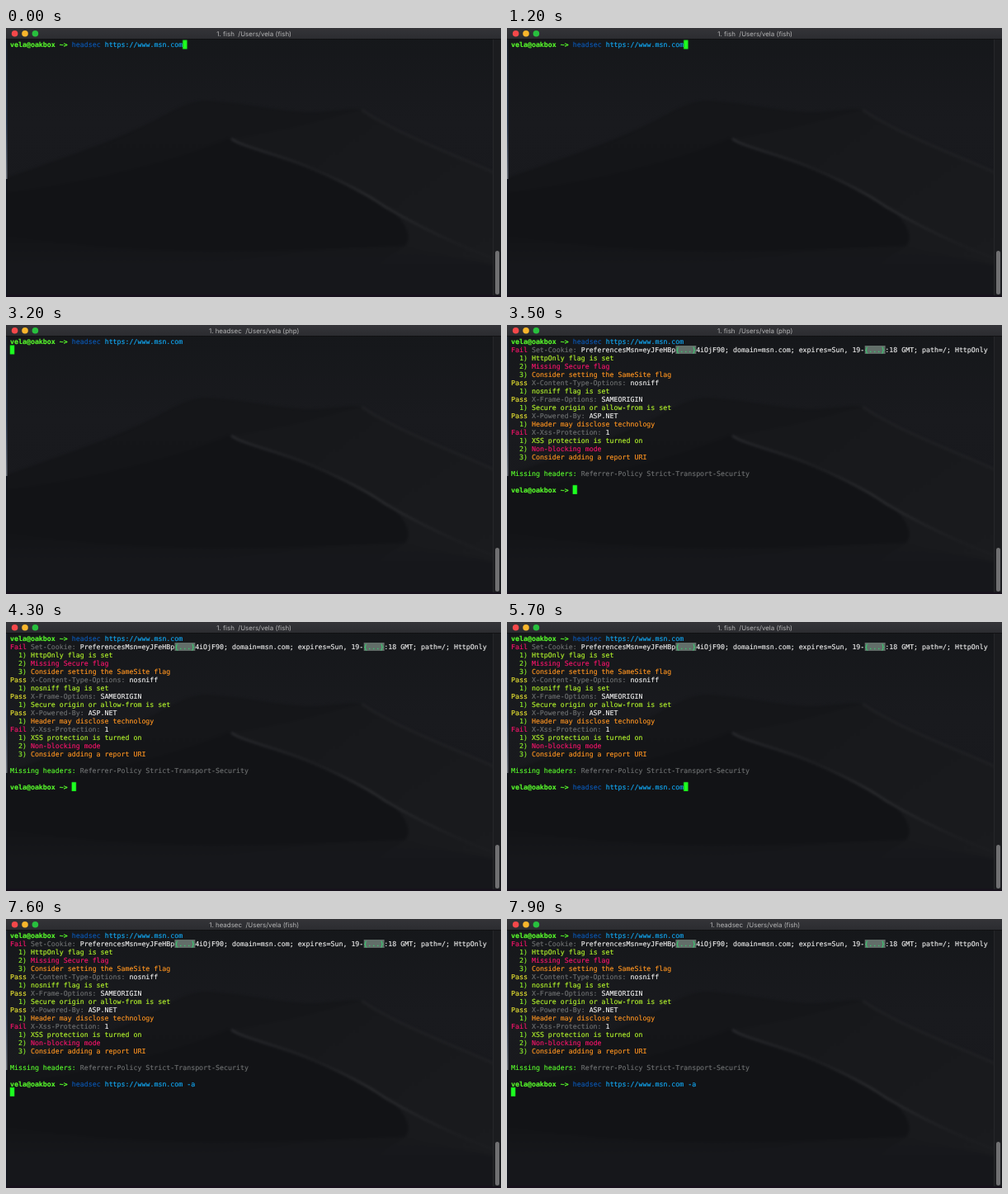
Write an HTML page that moves like this. It is 600 by 326 pixels and loops after 8 s.

```html
<!DOCTYPE html>
<html lang="en">
<head>
<meta charset="utf-8">
<title>Terminal session</title>
<style>
html, body { margin: 0; width: 100%; height: 100%; overflow: hidden; background: #15171a; }
svg { display: block; width: 100vw; height: 100vh; }
text { text-rendering: geometricPrecision; }

.term { font-family: "DejaVu Sans Mono", "Liberation Mono", monospace; font-size: 8.302px; }
.term text { fill: currentColor; stroke: currentColor; stroke-width: .15px; }
.title { font-family: Inter, "Open Sans", sans-serif; font-size: 7.95px; fill: #b4b4b5; text-anchor: middle; }

.ps { color: #58fa2c; font-weight: bold; }
.note { color: #58fa2c; }
.cmd { color: #0b58b4; }
.arg { color: #12a9f5; }
.fail { color: #f5146a; }
.pass { color: #e9e532; }
.ok { color: #b3f52c; }
.warn { color: #ff9420; }
.num { color: #8cf02c; }
.key { color: #6d6f70; }
.val { color: #ececec; }
.gap { color: #35d873; }
.gapBox { fill: #626e69; }

.cursor, .title, .show { animation: 8s step-end infinite; }
.cursor { fill: #1dff20; animation-name: cursor; }
.output { animation-name: output; }
.recall { animation-name: recall; }
.dash { animation-name: dash; }
.all { animation-name: all; }
.idle { animation-name: idle; }
.launch { animation-name: launch; }
.run { animation-name: run; }
.done { animation-name: done; }

/* one text column is 5 units, one line 10 */
@keyframes cursor {
  0% { transform: translate(210px, 0); opacity: 1; }
  8.75% { opacity: 0; }
  15% { opacity: 1; }
  21.25% { opacity: 0; }
  27.5% { opacity: 1; }
  32.5% { transform: translate(0, 10px); }
  43.75% { transform: translate(75px, 180px); }
  60% { transform: translate(210px, 180px); }
  77.5% { transform: translate(215px, 180px); }
  78.75% { transform: translate(220px, 180px); }
  83.75% { transform: translate(225px, 180px); }
  85%, 100% { transform: translate(0, 190px); opacity: 1; }
}
@keyframes output { 0% { opacity: 0; } 43.75%, 100% { opacity: 1; } }
@keyframes recall { 0% { opacity: 0; } 60%, 100% { opacity: 1; } }
@keyframes dash { 0% { opacity: 0; } 78.75%, 100% { opacity: 1; } }
@keyframes all { 0% { opacity: 0; } 83.75%, 100% { opacity: 1; } }

@keyframes idle { 0% { opacity: 1; } 33.75% { opacity: 0; } 53.75% { opacity: 1; } 95%, 100% { opacity: 0; } }
@keyframes launch { 0% { opacity: 0; } 33.75% { opacity: 1; } 36.25% { opacity: 0; } 95%, 100% { opacity: 1; } }
@keyframes run { 0% { opacity: 0; } 36.25% { opacity: 1; } 43.75%, 100% { opacity: 0; } }
@keyframes done { 0% { opacity: 0; } 43.75% { opacity: 1; } 53.75%, 100% { opacity: 0; } }
</style>
</head>
<body>
<svg viewBox="0 0 600 326" preserveAspectRatio="none">
  <defs>
    <linearGradient id="sky" x2="0" y2="1">
      <stop offset="0" stop-color="#15171a"/>
      <stop offset=".35" stop-color="#191a1e"/>
      <stop offset="1" stop-color="#17181c"/>
    </linearGradient>
    <linearGradient id="dune" x2="0" y2="1">
      <stop offset="0" stop-color="#151619"/>
      <stop offset=".6" stop-color="#131417"/>
      <stop offset="1" stop-color="#17181b"/>
    </linearGradient>
    <linearGradient id="slope" x2="1" y2="1">
      <stop offset="0" stop-color="#16171a"/>
      <stop offset="1" stop-color="#1a1b1e"/>
    </linearGradient>
    <linearGradient id="floor" x2="0" y2="1">
      <stop offset="0" stop-color="#17181b" stop-opacity="0"/>
      <stop offset=".5" stop-color="#16171b"/>
      <stop offset="1" stop-color="#16171b"/>
    </linearGradient>
    <linearGradient id="glow" x2="1" y2=".5">
      <stop offset="0" stop-color="#2b2c30"/>
      <stop offset=".35" stop-color="#202124"/>
      <stop offset=".6" stop-color="#303134"/>
      <stop offset="1" stop-color="#1d1e21"/>
    </linearGradient>
    <linearGradient id="edge" x2="0" y2="1">
      <stop offset="0" stop-color="#1a2230"/>
      <stop offset=".6" stop-color="#2b3a52"/>
      <stop offset="1" stop-color="#6d737d"/>
    </linearGradient>
    <linearGradient id="bar" x2="0" y2="1">
      <stop offset="0" stop-color="#343438"/>
      <stop offset="1" stop-color="#2b2c30"/>
    </linearGradient>
    <filter id="soft" color-interpolation-filters="sRGB" x="-10%" y="-10%" width="120%" height="120%"><feGaussianBlur stdDeviation="1.5"/></filter>
  </defs>

  <!-- desert behind the window -->
  <rect width="600" height="326" fill="url(#sky)"/>
  <g filter="url(#soft)">
    <path d="M-5 184C60 160 130 138 180 112C205 98 222 89 240 88C290 90 340 103 372 102C395 101 415 97 433 99C480 132 540 152 605 181V330H-5Z" fill="url(#dune)"/>
    <path d="M272 133C330 128 390 110 433 99C480 132 540 152 605 181V330H380L487 262Z" fill="url(#slope)"/>
    <path d="M272 133C285 144 330 153 370 170C420 190 462 212 478 232C490 248 490 260 482 263C430 268 380 266 330 276L-5 310V200C90 190 210 160 272 133Z" fill="#121316"/>
    <path d="M-5 250C160 280 340 270 480 264L605 290V330H-5Z" fill="url(#floor)"/>
    <path d="M273 134C285 144 330 153 370 170C410 187 440 203 460 217C500 240 550 266 605 284" fill="none" stroke="url(#glow)" stroke-width="2.4"/>
    <path d="M431 99C470 126 525 146 600 179" fill="none" stroke="#202124" stroke-width="3"/>
  </g>
  <rect y="13" width="1.5" height="170" fill="url(#edge)"/>
  <rect y="183" width="1.2" height="143" fill="#101521"/>
  <rect y="323.5" width="600" height="2.5" fill="#17111c"/>

  <!-- window frame -->
  <rect x="590" y="13" width="10" height="311" fill="#1b1c1f"/>
  <rect x="590" y="13" width=".7" height="311" fill="#2c2d30"/>
  <rect x="593" y="270" width="5" height="53" rx="2.5" fill="#707072"/>
  <rect width="600" height="13.5" fill="url(#bar)"/>
  <rect y="13" width="600" height=".7" fill="#0b0b0c"/>
  <circle cx="10.6" cy="6.7" r="3.8" fill="#f5484a"/>
  <circle cx="23" cy="6.7" r="3.8" fill="#f9b62c"/>
  <circle cx="35.4" cy="6.7" r="3.8" fill="#28c03e"/>
  <text class="title idle" x="300.7" y="9.8">1. fish&#160; /Users/vela (fish)</text>
  <text class="title launch" x="300.7" y="9.8">1. headsec&#160; /Users/vela (fish)</text>
  <text class="title run" x="300.7" y="9.8">1. headsec&#160; /Users/vela (php)</text>
  <text class="title done" x="300.7" y="9.8">1. fish&#160; /Users/vela (php)</text>

  <g class="term" transform="translate(5 23.4) scale(.997)">
    <text class="ps">vela@oakbox ~&gt;</text>
    <text x="75" class="cmd">headsec</text>
    <text x="115" class="arg">https://www.msn.com</text>

    <g class="show output">
      <rect class="gapBox" x="200" y="1.6" width="25" height="10"/>
      <rect class="gapBox" x="430" y="1.6" width="25" height="10"/>
      <text y="10"><tspan class="fail">Fail</tspan> <tspan class="key">Set-Cookie:</tspan> <tspan class="val">PreferencesMsn=eyJFeHBp</tspan><tspan class="gap">{...}</tspan><tspan class="val">4iOjF90; domain=msn.com; expires=Sun, 19-</tspan><tspan class="gap">{...}</tspan><tspan class="val">:18 GMT; path=/; HttpOnly</tspan></text>
      <text x="10" y="20"><tspan class="num">1)</tspan> <tspan class="ok">HttpOnly flag is set</tspan></text>
      <text x="10" y="30"><tspan class="num">2)</tspan> <tspan class="fail">Missing Secure flag</tspan></text>
      <text x="10" y="40"><tspan class="num">3)</tspan> <tspan class="warn">Consider setting the SameSite flag</tspan></text>
      <text y="50"><tspan class="pass">Pass</tspan> <tspan class="key">X-Content-Type-Options:</tspan> <tspan class="val">nosniff</tspan></text>
      <text x="10" y="60"><tspan class="num">1)</tspan> <tspan class="ok">nosniff flag is set</tspan></text>
      <text y="70"><tspan class="pass">Pass</tspan> <tspan class="key">X-Frame-Options:</tspan> <tspan class="val">SAMEORIGIN</tspan></text>
      <text x="10" y="80"><tspan class="num">1)</tspan> <tspan class="ok">Secure origin or allow-from is set</tspan></text>
      <text y="90"><tspan class="pass">Pass</tspan> <tspan class="key">X-Powered-By:</tspan> <tspan class="val">ASP.NET</tspan></text>
      <text x="10" y="100"><tspan class="num">1)</tspan> <tspan class="warn">Header may disclose technology</tspan></text>
      <text y="110"><tspan class="fail">Fail</tspan> <tspan class="key">X-Xss-Protection:</tspan> <tspan class="val">1</tspan></text>
      <text x="10" y="120"><tspan class="num">1)</tspan> <tspan class="ok">XSS protection is turned on</tspan></text>
      <text x="10" y="130"><tspan class="num">2)</tspan> <tspan class="fail">Non-blocking mode</tspan></text>
      <text x="10" y="140"><tspan class="num">3)</tspan> <tspan class="warn">Consider adding a report URI</tspan></text>
      <text y="160"><tspan class="note">Missing headers:</tspan> <tspan class="key">Referrer-Policy Strict-Transport-Security</tspan></text>
      <text y="180" class="ps">vela@oakbox ~&gt;</text>
    </g>

    <g class="show recall">
      <text x="75" y="180" class="cmd">headsec</text>
      <text x="115" y="180" class="arg">https://www.msn.com</text>
    </g>
    <g class="show dash"><text x="215" y="180" class="arg">-</text></g>
    <g class="show all"><text x="220" y="180" class="arg">a</text></g>

    <rect class="cursor" x="-.2" y="-8.8" width="5.4" height="10.9"/>
  </g>
</svg>
</body>
</html>
```
